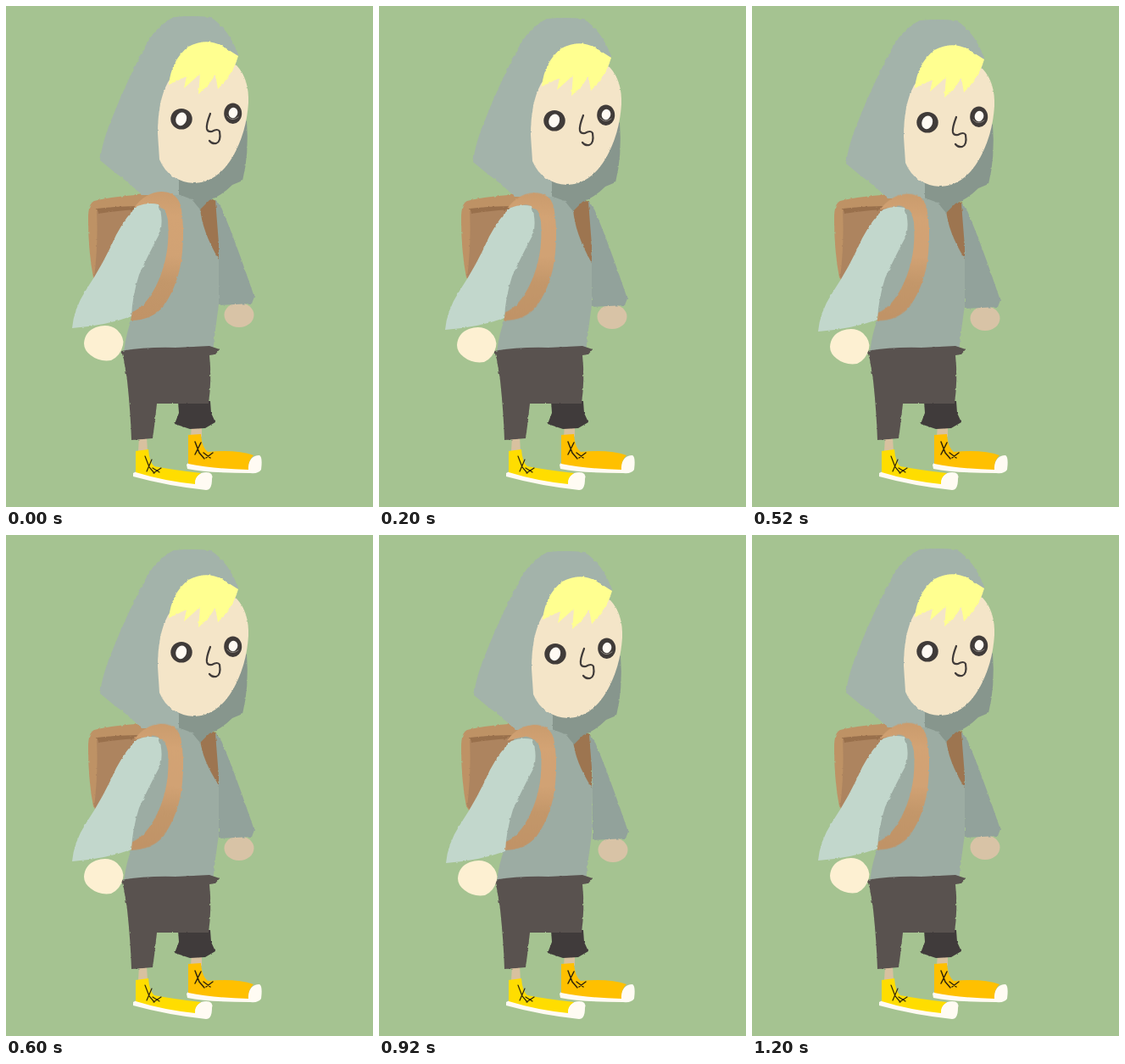
An HTML page for the animation above (1400 ms loop, 433 by 591 pixels).

```html
<!DOCTYPE html>
<html lang="en">
<head>
<meta charset="utf-8">
<title>Breathing hiker</title>
<style>
  html, body { margin: 0; width: 100%; height: 100%; overflow: hidden; background: #a5c391; }
  svg { display: block; width: 100%; height: 100%; }
  .rough { filter: url(#rough); }
  .sink, .chest, .tip { animation: sink 1.4s step-end infinite; }
  .chest { animation-name: chest; transform-origin: 0 405px; }
  .tip { animation-name: tip; transform-origin: 0 228px; }

  /* upper parts drop, torso compresses, then both rise again */
  @keyframes sink {
    0% { transform: none; }
    14.2857% { transform: translate(0, 2px); }
    28.5714%, 85.7143% { transform: translate(0, 4px); }
    42.8571%, 71.4286% { transform: translate(0, 5px); }
    57.1429% { transform: translate(1px, 7px); }
    100% { transform: none; }
  }
  @keyframes chest {
    0% { transform: none; }
    14.2857% { transform: scaleY(.993); }
    28.5714%, 85.7143% { transform: scaleY(.986); }
    42.8571%, 71.4286% { transform: scaleY(.98); }
    57.1429% { transform: scaleY(.974); }
    100% { transform: none; }
  }
  @keyframes tip {
    0% { transform: none; }
    14.2857% { transform: scaleY(1.05); }
    28.5714%, 85.7143% { transform: scaleY(.97); }
    42.8571%, 71.4286% { transform: scaleY(.91); }
    57.1429% { transform: scaleY(.95); }
    100% { transform: none; }
  }
</style>
</head>
<body>
<svg viewBox="0 0 433 591">
  <defs>
    <filter id="rough" filterUnits="userSpaceOnUse" x="0" y="0" width="433" height="591" color-interpolation-filters="sRGB">
      <feTurbulence type="fractalNoise" baseFrequency=".2" numOctaves="2" seed="4"/>
      <feDisplacementMap in="SourceGraphic" scale="2.5" xChannelSelector="R" yChannelSelector="G"/>
    </filter>
    <linearGradient id="leather" gradientUnits="userSpaceOnUse" x1="175" y1="215" x2="165" y2="371">
      <stop offset="0" stop-color="#c99b6d"/>
      <stop offset=".2" stop-color="#d3a374"/>
      <stop offset=".5" stop-color="#d1a274"/>
      <stop offset=".7" stop-color="#c3976a"/>
      <stop offset="1" stop-color="#c09367"/>
    </linearGradient>
  </defs>

  <g id="bag" class="rough">
    <path fill="#be9265" d="M97 250 Q97 233 104 230 Q128 224 170 222 L180 250 L112 334 L103 320 Q97 290 97 250Z"/>
    <path fill="#ad845f" d="M107 242 L158 236 L170 245 L112 330 L104 320 Q109 280 107 242Z"/>
    <path fill="#99704c" d="M107 239 Q130 236 163 236 L154 240 Q128 242 109 245Z"/>
  </g>

  <g id="feet">
    <path fill="#d8c19f" d="M157 508 L166 508 L167 526 L156 526Z M219 494 L231 494 L231 508 L218 508Z"/>
    <path fill="#fffbf3" d="M213 541 L216 538 Q250 545 285 546 Q287 530 299 530 Q303 532 301 547 Q298 552 288 551 Q240 551 214 546Z"/>
    <path fill="#ffc000" d="M215 506 L230 505 Q231 521 238 526 Q272 523 292 530 Q285 537 286 547 Q245 546 215 540Z"/>
    <path fill="#fffbf3" d="M150 551 L154 549 Q190 558 222 562 Q225 550 236 550 Q245 550 243 558 Q243 571 236 571 Q190 566 150 555Z"/>
    <path fill="#ffdd00" d="M153 525 L168 523 Q169 538 175 543 Q195 547 230 551 Q222 556 223 564 Q185 560 153 550Z"/>
    <g fill="none" stroke="#31260a" stroke-width="1.5" stroke-linecap="round">
      <path stroke-width="1.2" d="M164 531 L169 544 L175 551 M172 535 L166 549 M173 545 L181 550 M183 545 L174 551"/>
      <path d="M223 514 L228 527 L234 534 M230 515 L223 529 M233 527 L241 533 M244 527 L236 533"/>
    </g>
  </g>

  <g class="rough">
    <g class="chest">
      <path fill="#9caca3" d="M160 232 L200 217 L244 228 Q252 260 252 300 L251 352 Q247 380 244 408 L139 408 Q142 385 148 370 L145 320Z"/>
    </g>
    <g class="chest">
      <path class="tip" fill="#9d7550" d="M239 226 L248 230 Q252 248 251 262 L251 299 Q231 265 229 238Z"/>
    </g>
  </g>

  <g id="pants" class="rough">
    <path fill="#403b3b" d="M203 466 L241 466 L242 480 L247 491 L235 498 L217 499 L199 493 L204 480Z"/>
    <path fill="#59524f" d="M136 407 Q165 402 200 403 L240 401 L252 405 L247 411 L240 412 Q243 440 239 469 L178 469 Q176 490 173 510 L148 512 Q147 480 143 442 L139 417Z"/>
  </g>

  <g id="far-arm" class="sink">
    <ellipse cx="275" cy="364.500" rx="17.500" ry="14.500" fill="#d8c3a6"/>
    <path class="rough" fill="#92a29b" d="M247 229 L253 235 Q266 266 277 297 L293 343 L290 351 L251 353 L251 280Z"/>
  </g>

  <g id="head" class="sink">
    <g class="rough">
      <path fill="#87968d" d="M203 200 L270 150 L284 135 Q287 175 279 206 L267 211 Q254 224 240 229 L229 240 L219 228 L203 222Z"/>
      <path fill="#a3b3aa" d="M111 182 Q113 161 126 130 Q141 92 163 50 Q176 24 198 13 Q220 11 241 13 Q262 26 274 57 L270 75 L185 110 L190 185 L204 206 L204 223 L160 223 Q145 208 128 196Z"/>
      <path fill="#f4e5c8" d="M191 90 Q210 60 245 60 L272 70 Q287 86 286 114 Q284 148 268 177 Q250 208 222 209 Q192 207 181 181 L179 150 Q179 112 191 90Z"/>
      <path fill="#ffff90" d="M192 93 Q195 64 215 48 Q236 37 255 47 L274 59 L271 68 Q264 84 250 98 L247 81 L239 93 L227 104 L229 80 L210 97 L213 83Z"/>
    </g>
    <g fill="#403b39">
      <ellipse cx="207" cy="133.200" rx="12.700" ry="12.300"/>
      <ellipse cx="267.700" cy="126.700" rx="10.500" ry="12.200"/>
    </g>
    <g fill="#fffaf3">
      <ellipse cx="206.700" cy="133.300" rx="6.300" ry="8" transform="rotate(20 206.700 133.300)"/>
      <ellipse cx="268" cy="126" rx="5.300" ry="6.200" transform="rotate(15 268 126)"/>
    </g>
    <g fill="none" stroke-linecap="round">
      <path stroke="#a19b93" stroke-width=".8" d="M261 130 Q266 137 274 131"/>
      <path stroke="#403b39" stroke-width="2.200" d="M241 127 Q236 140 237 145 Q238 149 243 148 Q250 144 252 148 Q254 160 248 162 Q243 163 240 159"/>
    </g>
  </g>

  <g class="rough">
    <path class="chest" fill="url(#leather)" d="M151 238 Q164 220 183 219 Q201 219 206 235 Q211 260 208 290 Q205 326 186 354 Q172 371 147 371 L149 361 Q166 354 179 326 Q194 293 191 253 Q188 235 173 233Z"/>
  </g>

  <g id="near-arm" class="sink">
    <path fill="#fdf0d2" d="M92 398 Q93 384 106 379 Q121 374 131 382 Q140 391 138 400 Q135 413 124 418 Q110 420 100 412 Q92 406 92 398Z"/>
    <path class="rough" fill="#c2d7cc" d="M78 380 Q80 357 95 334 Q115 304 130 270 Q143 246 155 236 Q167 231 180 234 Q186 251 182 267 Q167 295 157 317 Q149 342 148 366 Q118 377 78 380Z"/>
  </g>
</svg>
</body>
</html>
```
